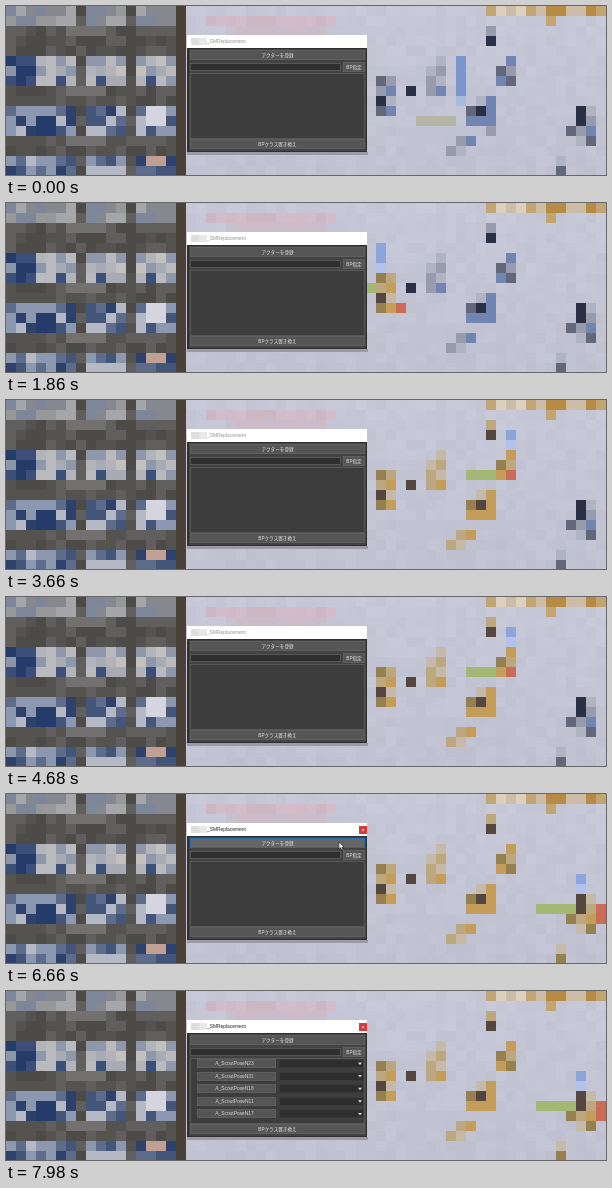
An HTML page with a canvas for the animation above (8 s loop, 600 by 169 pixels).

```html
<!DOCTYPE html>
<html lang="ja">
<head>
<meta charset="utf-8">
<title>SMReplacement</title>
<style>
html, body { margin: 0; width: 100%; height: 100%; overflow: hidden; background: #c4c5d4; }
canvas { display: block; width: 600px; height: 169px; }
</style>
</head>
<body>
<canvas id="stage" width="600" height="169"></canvas>
<script>
const LOOP = 8000;
const CELL = 10;
const ctx = document.getElementById('stage').getContext('2d');
const FONT = '"Liberation Sans", "Noto Sans CJK JP", "Noto Sans CJK", sans-serif';

function rect(x, y, w, h, color) {
  ctx.fillStyle = color;
  ctx.fillRect(x, y, w, h);
}

function box(x, y, w, h, fill, edge) {
  rect(x, y, w, h, edge);
  rect(x + 1, y + 1, w - 2, h - 2, fill);
}

function label(str, x, y, size, color, align = 'center') {
  ctx.font = `${size}px ${FONT}`;
  ctx.textAlign = align;
  ctx.textBaseline = 'middle';
  ctx.fillStyle = color;
  ctx.fillText(str, x, y);
}

// Stable pseudo-random value for a mosaic cell
function noise(col, row, seed) {
  const v = Math.sin(col * 127.1 + row * 311.7 + seed * 74.7) * 43758.5453;
  return v - Math.floor(v);
}

function pick(list, col, row, seed) {
  return list[Math.floor(noise(col, row, seed) * list.length)];
}

function cell(col, row, color, w = 1, h = 1) {
  rect(col * CELL, row * CELL, w * CELL, h * CELL, color);
}

// Mosaic patch whose cells vary within a palette
function patch(col, row, w, h, colors, seed) {
  for (let r = row; r < row + h; r++) {
    for (let c = col; c < col + w; c++) cell(c, r, pick(colors, c, r, seed));
  }
}

const TOP = ['#979899', '#a4a6aa', '#85898f', '#7e879a'];
const THUMB = ['#b9babd', '#a7abb4', '#c3c1bf', '#8f98aa', '#b2b4ba'];
const DENIM = ['#2e416b', '#435679', '#8b98b0', '#b4b9c5', '#5d6c8b'];
const LABEL = ['#55534f', '#605f5d', '#4d4b47'];
const NAVY = ['#253b6a', '#3b4f78'];
const GOLD = ['#b98d32', '#a58951'];

function drawBrowser(marked) {
  patch(0, 0, 18, 17, LABEL, 4);
  for (const [col, w] of [[0, 3], [3, 4], [8, 4], [13, 4]]) {
    patch(col, 0, w, 2, TOP, 4);
    patch(col, 5, w, 3, THUMB, 4);
    patch(col, 10, w, 3, DENIM, 4);
    patch(col, 15, w, 2, DENIM, 4);
  }
  for (const row of [2, 8, 13]) cell(6, row, '#72716f', 4);
  patch(0, 5, 3, 3, NAVY, 6);
  cell(0, 6, '#8b96ab');
  for (const col of [5, 9, 14]) cell(col, 7, NAVY[1]);
  for (const col of [3, 4]) cell(col, 11, NAVY[0], 1, 2);
  cell(14, 10, '#d4d5de', 2, 2);
  cell(14, 15, '#c0a093', 2);
  rect(170, 0, 10, 169, '#4a4239');
  if (!marked) return;
  patch(6, 9, 4, 1, GOLD, 2);
  cell(6, 10, GOLD[0], 1, 3);
  cell(9, 10, GOLD[1], 1, 3);
  cell(6, 13, '#d8a318', 4);
  cell(6, 14, '#c18a0b', 4);
}

function drawFloor() {
  for (let r = 0; r < 17; r++) {
    for (let c = 18; c < 60; c++) {
      const n = Math.round(noise(c, r, 9) * 6 - 3 - r * 0.35);
      cell(c, r, `rgb(${199 + n},${200 + n},${215 + n})`);
    }
  }
  // Faded notice above the window
  patch(20, 1, 13, 1, ['#d1b9c6', '#cdb7c3', '#d3bdca'], 2);
  patch(22, 2, 10, 1, ['#c9bdcb', '#c5c1cf', '#cbbcc8'], 2);
  patch(48, 0, 12, 1, ['#c3a574', '#b78b45', '#ddd0be', '#cbbda8'], 5);
  cell(54, 1, '#c3a574');
}

// Each figure: mosaic blobs [column, row, width, height] and its dark cells
const FIGURES = [
  { blobs: [[37, 7, 2, 4]], dark: [[37, 9]] },
  { blobs: [[42, 6, 2, 3], [43, 5, 1, 1]], dark: [[40, 8]] },
  { blobs: [[46, 10, 3, 2], [47, 9, 2, 1], [45, 13, 2, 1], [44, 14, 2, 1]], dark: [[47, 10]] },
  { blobs: [[48, 2, 1, 1], [49, 6, 2, 2], [50, 5, 1, 1]], dark: [[48, 3]] },
  { blobs: [[57, 10, 2, 2], [56, 12, 3, 1], [57, 13, 2, 1], [55, 15, 1, 2]], dark: [[57, 10], [57, 11]] }
];
const PLAIN = ['#626879', '#979bac', '#7185b2', '#b0b3c2'];
const PICKED = ['#96804f', '#bda77f', '#c59d5a', '#c5b9a9'];
const PICK_TIMES = [1590, 2250, 3030, 3660, 5040];

function drawFigure({ blobs, dark }, picked) {
  for (const [c, r, w, h] of blobs) patch(c, r, w, h, picked ? PICKED : PLAIN, 7);
  for (const [c, r] of dark) cell(c, r, picked ? '#55473f' : '#2a3046');
}

// Move handles: up = [column, row, length], side = [column, row, length], front = [column, row, length]
const GIZMOS = [
  { up: [37, 4, 3], side: [36, 8, 1], front: [39, 10, 1] },
  { up: [42, 3, 3], side: [39, 7, 3], front: [43, 8, 1] },
  { up: [45, 5, 5], side: [41, 11, 4], front: [48, 12, 1] },
  { up: [50, 3, 2], side: [46, 7, 3], front: [50, 7, 1] },
  { up: [57, 8, 2], side: [53, 11, 4], front: [59, 11, 2] }
];
const VIVID = ['#8ca6dc', '#b2c2ea', '#a3b873', '#cb6b58'];
const MUTED = ['#7b96cc', '#a9badf', '#b5b6a6', '#9b9cac'];

function drawGizmo({ up, side, front }, [blue, pale, green, red]) {
  cell(up[0], up[1], blue, 1, up[2]);
  cell(up[0], up[1] + up[2] - 1, pale);
  cell(side[0], side[1], green, side[2]);
  cell(front[0], front[1], red, 1, front[2]);
}

function drawViewport(t, marked) {
  drawFloor();
  const count = marked ? 5 : PICK_TIMES.filter(p => t >= p).length;
  FIGURES.forEach((f, i) => drawFigure(f, i < count));
  if (t < 1440) drawGizmo(GIZMOS[2], marked ? VIVID : MUTED);
  else if (count) drawGizmo(GIZMOS[count - 1], VIVID);
}

const ITEMS = ['23', '31', '18', '11', '17'].map(n => 'A_ScoutPoseN' + n);

function button(str, x, y, w, h, hover) {
  box(x, y, w, h, hover ? '#666666' : '#555555', hover ? '#2b6ca8' : '#5f5f5f');
  label(str, x + w / 2, y + h / 2 + 0.3, 4.6, '#e4e4e4');
}

function drawRows(filled) {
  ITEMS.forEach((name, i) => {
    const y = 68 + i * 12.6;
    box(191, Math.round(y), 79, 9, '#555555', '#5e5e5e');
    label(name, 228.5, y + 4.6, 4.9, '#d4d4d4');
    box(273, Math.round(y), 85, 9, '#2e2e2e', '#393939');
    if (filled) label(name, 275, y + 4.6, 4.9, '#dadada', 'left');
    ctx.fillStyle = '#d8d8d8';
    ctx.beginPath();
    ctx.moveTo(352, y + 3.5);
    ctx.lineTo(356, y + 3.5);
    ctx.lineTo(354, y + 6);
    ctx.fill();
  });
}

function drawWindow(t, marked) {
  const active = t >= 6540;
  rect(181, 146, 181, 3, '#9a9ba6');
  rect(181, 29, 180, 117, '#303030');
  rect(181, 29, 180, 13, '#ffffff');
  rect(183, 43, 177, 102, '#434343');
  rect(185, 32, 8, 7, '#dedede');
  rect(193, 32, 8, 7, '#e8e8e8');
  label('_SMReplacement', 201, 35.8, 4.9, active ? '#222222' : '#939393', 'left');
  if (active) {
    rect(353, 32, 8, 8, '#d23c3c');
    label('×', 357, 36, 6, '#ffffff');
  }
  button('アクターを登録', 184, 44, 175, 10, t >= 6000 && t < 6960);
  box(184, 57, 151, 8, '#2f2f2f', '#565656');
  if (marked) {
    for (let x = 189; x < 317; x += 5) {
      rect(x, 59, 5, 4, pick(['#646464', '#484848', '#585858'], x, 1, 3));
    }
  }
  button('BP指定', 337, 56, 22, 10, t >= 5850 && t < 6000);
  box(184, 67, 175, 66, '#3d3d3d', '#575757');
  if (marked || t >= 6810) drawRows(marked);
  button('BPクラス置き換え', 184, 133, 175, 10, false);
}

// Cursor stops: [time, x, y]
const PATH = [[5730, 358, 68], [5850, 351, 61], [6000, 340, 52], [6150, 333, 48], [6960, 312, 58], [7350, 188, 98]];
const ARROW = 'M0 0V7L1.6 5.6 2.8 8.2 4 7.6 2.9 5.1H5Z';

function drawCursor(t) {
  const stop = PATH.filter(p => t >= p[0]).pop();
  if (!stop || t >= 7500) return;
  const arrow = new Path2D(ARROW);
  ctx.save();
  ctx.translate(stop[1], stop[2]);
  ctx.lineWidth = 0.6;
  ctx.strokeStyle = '#222222';
  ctx.fillStyle = '#ffffff';
  ctx.fill(arrow);
  ctx.stroke(arrow);
  ctx.restore();
}

function draw(t) {
  const marked = t >= 1320 && t < 1440;
  drawViewport(t, marked);
  drawBrowser(marked);
  drawWindow(t, marked);
  drawCursor(t);
}

const start = performance.now();
function tick() {
  draw((performance.now() - start) % LOOP);
  requestAnimationFrame(tick);
}
tick();
</script>
</body>
</html>
```
